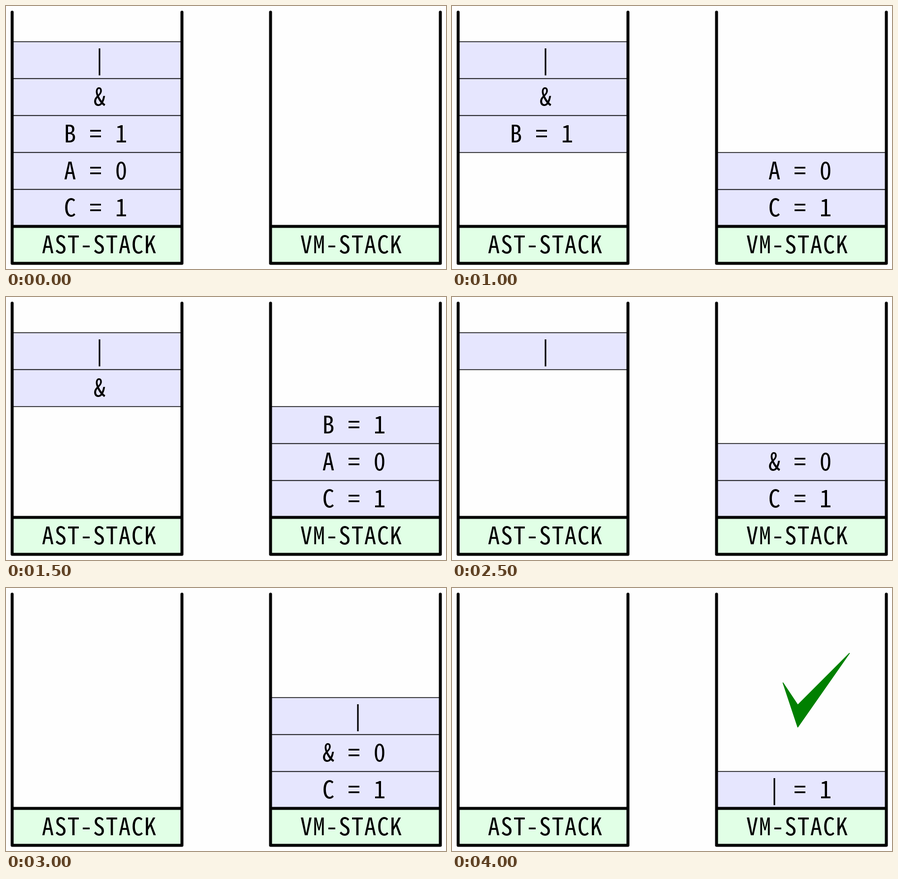
These frames come from a looping animation (894x534 px, 4500 ms). An HTML page with a canvas:

```html
<!DOCTYPE html>
<html lang="en">
<head>
<meta charset="utf-8">
<title>Stack evaluation</title>
<style>
html, body { margin: 0; width: 100%; height: 100%; overflow: hidden; background: #fefefe; }
canvas { display: block; }
</style>
</head>
<body>
<canvas id="stage" width="894" height="534"></canvas>
<script>
const ctx = document.getElementById('stage').getContext('2d');

const STEP = 500;
const ROW = 75, WIDTH = 345, CELL = 26;
const TOP = 12.5, FLOOR = 447.5, BASE = 522.5;
const AST_X = 12.5, VM_X = 537.5;
const FONT = '49px "Noto Sans Mono CJK JP", "Noto Sans Mono CJK SC", "Noto Sans Mono", monospace';

// The AST column is consumed from its lowest row; each step lists the VM stack bottom up.
const AST = ['|', '&', 'B = 1', 'A = 0', 'C = 1'];
const STEPS = [
  { left: 5, vm: [] },
  { left: 4, vm: ['C = 1'] },
  { left: 3, vm: ['C = 1', 'A = 0'] },
  { left: 2, vm: ['C = 1', 'A = 0', 'B = 1'] },
  { left: 1, vm: ['C = 1', 'A = 0', 'B = 1', '&'] },
  { left: 1, vm: ['C = 1', '& = 0'] },
  { left: 0, vm: ['C = 1', '& = 0', '|'] },
  { left: 0, vm: ['| = 1'] },
  { left: 0, vm: ['| = 1'], done: true }
];

function label(text, x, baseline) {
  ctx.fillStyle = '#000';
  [...text].forEach((ch, i) => ctx.fillText(ch, x + (i + 0.5) * CELL, baseline));
}

function box(x, y, fill) {
  ctx.fillStyle = fill;
  ctx.fillRect(x, y, WIDTH, ROW);
}

function item(text, x, y) {
  box(x, y, '#e6e6fe');
  ctx.lineWidth = 1.5;
  ctx.strokeStyle = '#000';
  ctx.strokeRect(x, y, WIDTH, ROW);
  label(text, x - 0.5 + (text.length > 1 ? 105 : 165), y + 54);
}

function container(name, x) {
  box(x, FLOOR, '#e1ffe6');
  ctx.lineWidth = 6;
  ctx.strokeStyle = '#000';
  ctx.beginPath();
  ctx.moveTo(x, TOP);
  ctx.lineTo(x, BASE);
  ctx.lineTo(x + WIDTH, BASE);
  ctx.lineTo(x + WIDTH, TOP);
  ctx.moveTo(x, FLOOR);
  ctx.lineTo(x + WIDTH, FLOOR);
  ctx.stroke();
  label(name, x - 0.5 + 60, FLOOR + 54);
}

function tick() {
  ctx.beginPath();
  ctx.moveTo(672.5, 192.5);
  ctx.lineTo(702.5, 237.5);
  ctx.lineTo(807.5, 132.5);
  ctx.lineTo(702.5, 282.5);
  ctx.closePath();
  ctx.fillStyle = ctx.strokeStyle = '#008000';
  ctx.lineWidth = 1.5;
  ctx.fill();
  ctx.stroke();
}

function draw(step) {
  ctx.fillStyle = '#fefefe';
  ctx.fillRect(0, 0, 894, 534);
  ctx.font = FONT;
  ctx.textAlign = 'center';
  ctx.lineCap = ctx.lineJoin = 'round';
  AST.slice(0, step.left).forEach((text, i) => item(text, AST_X, 72.5 + i * ROW));
  step.vm.forEach((text, i) => item(text, VM_X, FLOOR - (i + 1) * ROW));
  container('AST-STACK', AST_X);
  container('VM-STACK', VM_X);
  if (step.done) tick();
}

const start = performance.now();
function frame() {
  const elapsed = performance.now() - start;
  draw(STEPS[Math.floor(elapsed / STEP) % STEPS.length]);
  requestAnimationFrame(frame);
}
frame();
</script>
</body>
</html>
```
